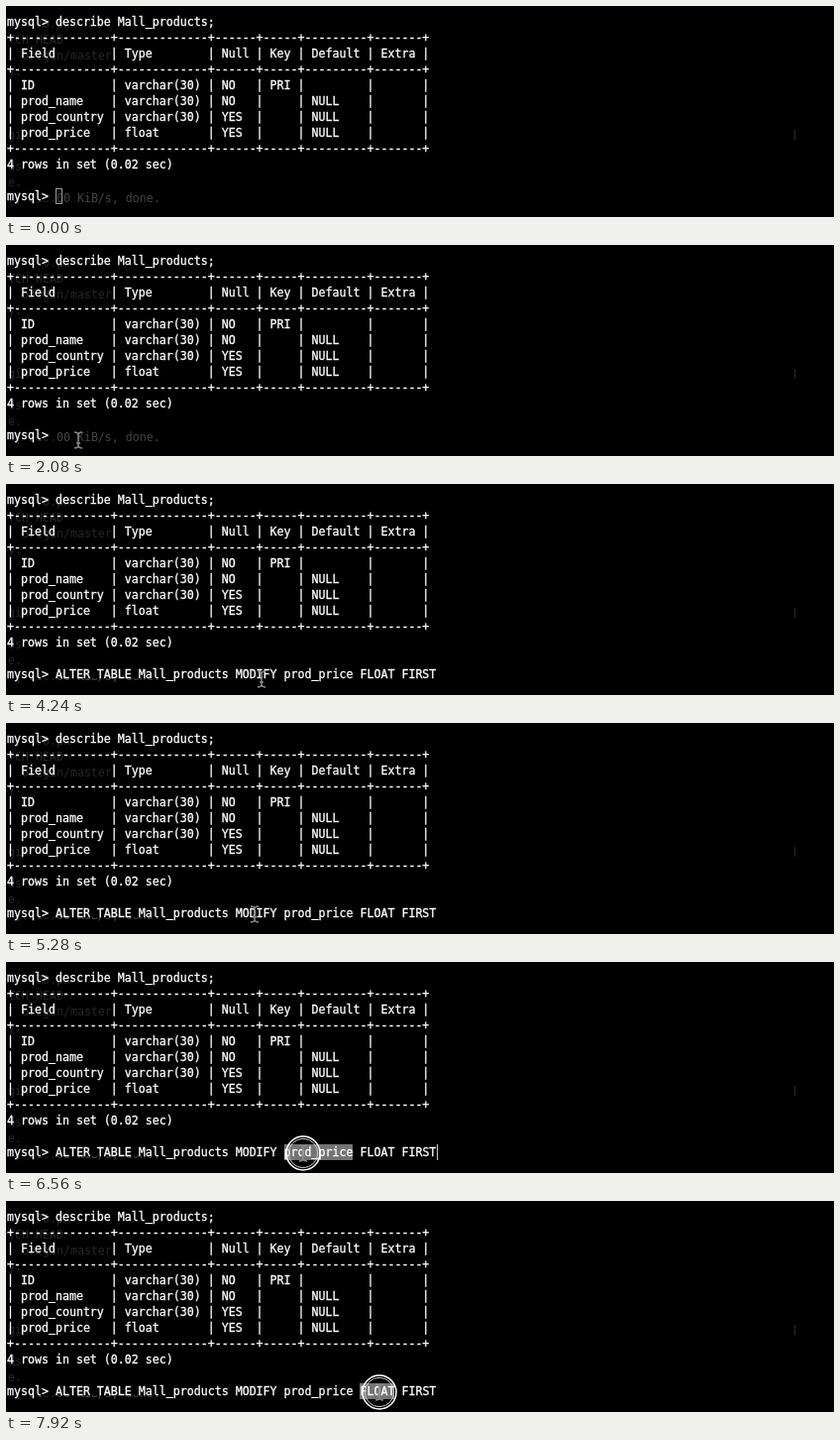
Recreate the animation shown at these times as an HTML page. Size 836x213 px, loop 8000 ms.

```html
<!DOCTYPE html>
<html lang="en">
<head>
<meta charset="utf-8">
<title>Terminal session</title>
<style>
html, body { margin: 0; width: 100%; height: 100%; overflow: hidden; background: #000; }
pre, div, svg { position: absolute; margin: 0; }
pre {
  left: 1px; top: 8px; color: #fff;
  font: 11.627px/16px "DejaVu Sans Mono", monospace;
  -webkit-text-stroke: 0.3px;
}
#ghost { left: 2px; top: 10px; color: #262626; -webkit-text-stroke: 0; }
#ghost b { font-weight: normal; color: #444; }
#cover { left: 0; top: 184px; height: 12px; background: #000; }
#line { top: 184px; height: 16px; }
mark { display: inline-block; height: 16px; vertical-align: top; color: #fff; background: #747474; }
#caret { top: 184px; height: 16px; width: 1px; box-sizing: border-box; background: #ccc; }
#caret.idle { width: 7px; background: none; border: 1px solid #999; }
#tick { left: 796px; top: 125px; width: 1px; height: 10px; background: #2a2a2a; }
svg { left: 0; top: 0; width: 100%; height: 100%; fill: none; }
</style>
</head>
<body>
<pre id="ghost">  -470.px
TCH_HEAD
  origin/master
y.



gin

ds
e.
 | 216.<b>00 KiB/s, done.</b></pre>
<div id="tick"></div>
<pre>mysql> describe Mall_products;
+--------------+-------------+------+-----+---------+-------+
| Field        | Type        | Null | Key | Default | Extra |
+--------------+-------------+------+-----+---------+-------+
| ID           | varchar(30) | NO   | PRI |         |       |
| prod_name    | varchar(30) | NO   |     | NULL    |       |
| prod_country | varchar(30) | YES  |     | NULL    |       |
| prod_price   | float       | YES  |     | NULL    |       |
+--------------+-------------+------+-----+---------+-------+
4 rows in set (0.02 sec)</pre>
<div id="cover"></div>
<pre id="line"></pre>
<div id="caret"></div>
<svg>
  <g id="mouse">
    <g id="ring" stroke="#fff">
      <circle r="17" stroke-width="1.5"/>
      <circle r="14.7" stroke="#ccc"/>
    </g>
    <path stroke="#888" stroke-width="1.5" d="M-4-8Q0-8 0-5Q0-8 4-8M0-5V5M-4 8Q0 8 0 5Q0 8 4 8M-2 3H2"/>
  </g>
</svg>
<script>
const LOOP = 8000, STEP = 80, CELL = 7;
const APPEAR = 640, FOCUS = 1120, PASTE = 2480, BLINK = 480;
const prompt = 'mysql> ';
const command = prompt + 'ALTER TABLE Mall_products MODIFY prod_price FLOAT FIRST';
const [line, cover, caret, mouse, ring] =
  ['line', 'cover', 'caret', 'mouse', 'ring'].map(id => document.getElementById(id));

const picks = [
  { word: 'MODIFY', press: 5440 },
  { word: 'prod_price', press: 6400 },
  { word: 'FLOAT', press: 7760 }
];
const presses = [FOCUS, ...picks.map(p => p.press)];

// Each glide starts where the last one ended; the mouse reaches a word shortly before pressing.
const glides = [
  { from: APPEAR, time: 320, x: 95, y: 183 },
  { from: 1520, time: 240, x: 73, y: 197 },
  { from: 3280, time: 560, x: 258, y: 197, lift: 42 },
  ...picks.map(({ word, press }) => (
    { from: press - 640, time: 480, x: command.indexOf(word) * CELL + 20, y: 193 }))
];

function mouseAt(t) {
  let x = 250, y = 150;
  for (const g of glides) {
    const k = Math.min(1, Math.max(0, (t - g.from) / g.time));
    const ease = 1 - (1 - k) ** 2;
    x += (g.x - x) * ease;
    y += (g.y - y) * ease - (g.lift || 0) * Math.sin(Math.PI * ease);
  }
  return [x, y];
}

function draw(t) {
  const text = t < PASTE ? prompt : command;
  const width = text.length * CELL;
  const picked = picks.filter(p => p.press + STEP <= t).pop();
  line.innerHTML = picked ? text.replace(picked.word, '<mark>$&</mark>') : text;
  cover.style.width = width + 'px';

  const idle = t < FOCUS;
  const lit = Math.floor((t - FOCUS) / BLINK) % 2 === 1;
  const justPasted = t >= PASTE && t < PASTE + BLINK;
  caret.className = idle ? 'idle' : '';
  caret.style.left = width + 1 + 'px';
  caret.style.visibility = idle || lit || justPasted ? 'visible' : 'hidden';

  mouse.style.display = t < APPEAR ? 'none' : '';
  mouse.setAttribute('transform', `translate(${mouseAt(t)})`);
  ring.style.display = presses.some(p => t >= p && t < p + 320) ? '' : 'none';
}

const start = performance.now();
function frame() {
  const t = (performance.now() - start) % LOOP;
  draw(Math.floor(t / STEP) * STEP);
  requestAnimationFrame(frame);
}
frame();
</script>
</body>
</html>
```
